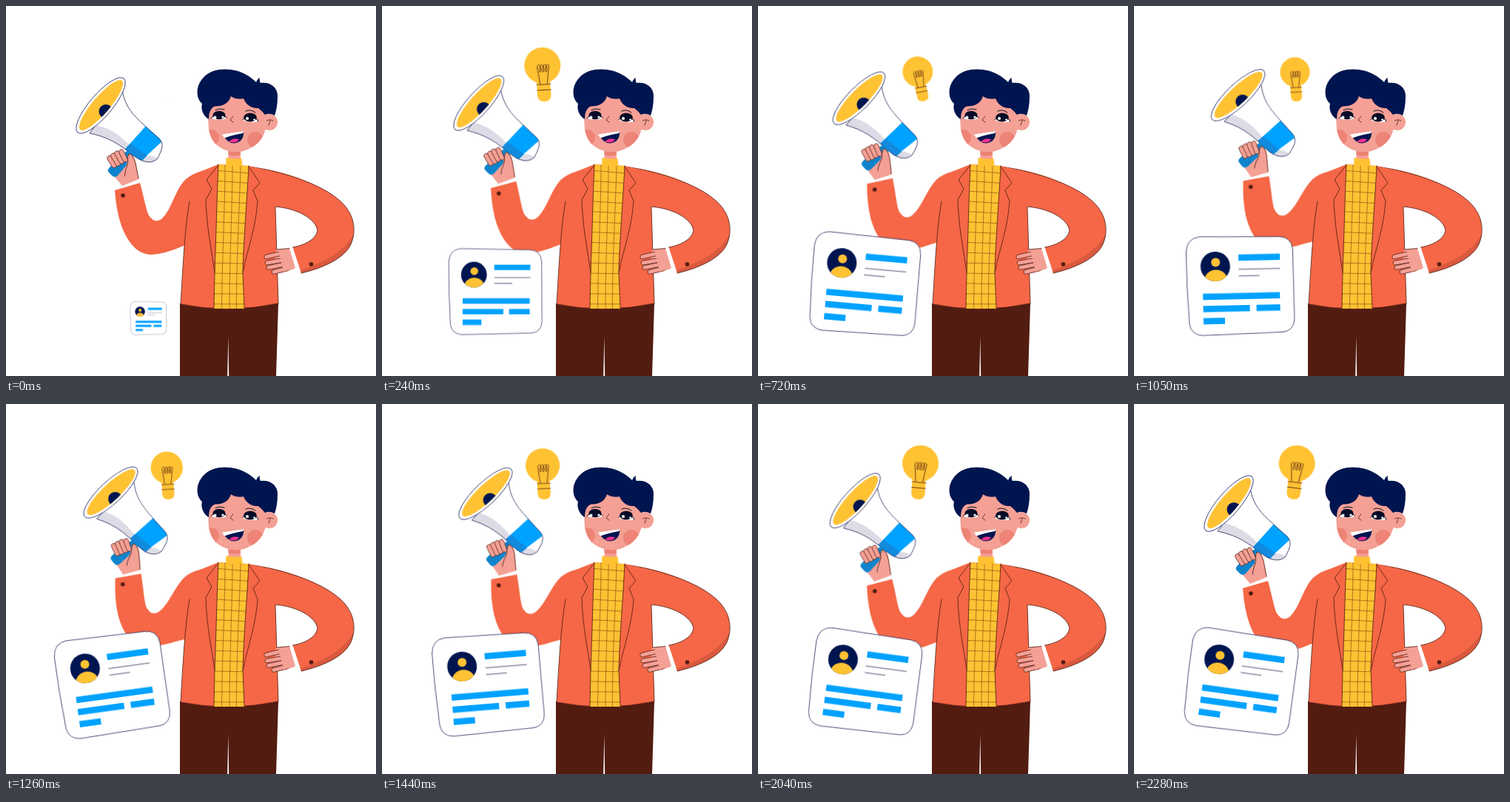
These frames come from a looping animation (500x500 px, 2450 ms). An HTML page:

```html
<!DOCTYPE html>
<html lang="en">
<head>
<meta charset="utf-8">
<title>Announcement</title>
<style>
html, body { margin: 0; width: 100%; height: 100%; overflow: hidden; background: #fff; }
svg { display: block; width: 100vw; height: 100vh; }

.orange { fill: #f56746; }
.skin { fill: #f4a095; }
.yellow { fill: #ffc233; }
.navy { fill: #001550; }
.blue { fill: #00a2ff; }
.brown { fill: #521c11; }
.white { fill: #fff; }
.grey { fill: #dddce6; }
.line { fill: none; stroke: #4c1a10; stroke-width: .8; stroke-linecap: round; stroke-linejoin: round; }
.thread { fill: none; stroke: #7a4310; stroke-width: .6; }
.ink { fill: none; stroke: #080c26; stroke-width: 1; stroke-linecap: round; stroke-linejoin: round; }
.edge { stroke: #24245a; stroke-width: .8; }
.knuckle { stroke: #4c1a10; stroke-width: .7; }

#arm, #bulb, #bulb-size, #card, #card-size {
  animation: 2450ms linear infinite;
}
#arm { transform-origin: 268px 248px; animation-name: swing; }
#bulb { transform-origin: 219px 100px; animation-name: bulb-tilt; }
#bulb-size { transform-origin: 219px 129px; animation-name: bulb-size; }
#card { transform-origin: 155px 381px; animation-name: card-tilt; }
#card-size { transform-origin: 217px 444.5px; animation-name: card-size; }

@keyframes swing {
  0% { transform: rotate(0deg); }
  42.86% { transform: rotate(6deg); }
  50.6% { transform: rotate(6.5deg); }
  58.8% { transform: rotate(5.7deg); }
  93.06%, 100% { transform: rotate(0deg); }
}
@keyframes bulb-tilt {
  0% { transform: rotate(0deg); }
  18.37% { transform: rotate(-5.5deg); }
  29.4% { transform: rotate(-11deg); }
  42.86% { transform: rotate(-3deg); }
  58.8% { transform: rotate(-2.5deg); }
  73.5% { transform: rotate(1.5deg); }
  88.16%, 100% { transform: rotate(7deg); }
}
@keyframes bulb-size {
  0% { transform: scale(0); }
  9.8% { transform: scale(1); }
  37% { transform: scale(.77); }
  66%, 100% { transform: scale(1); }
}
@keyframes card-tilt {
  0%, 12.2% { transform: rotate(0deg); }
  18.37% { transform: rotate(1deg); }
  31% { transform: rotate(5.7deg); animation-timing-function: ease-in; }
  42.86% { transform: rotate(-1.2deg); animation-timing-function: ease-out; }
  52.7% { transform: rotate(-8deg); }
  58.8% { transform: rotate(-4.7deg); }
  73.5% { transform: rotate(6deg); animation-timing-function: ease-out; }
  88.16%, 100% { transform: rotate(8deg); }
}
@keyframes card-size {
  0% { transform: scale(.335); }
  12.2%, 100% { transform: scale(1); }
}
</style>
</head>
<body>
<svg viewBox="0 0 500 500" xmlns="http://www.w3.org/2000/svg">
  <defs>
    <clipPath id="rim"><ellipse cx="128.5" cy="134" rx="43.5" ry="11.5" transform="rotate(-49.5 128.5 134)"/></clipPath>
    <path id="horn-shape" d="M157 114C161 136 171 147 189 163L207 179Q214 186 209 197L205 206Q197 214 184 209C168 203 154 180 113 172Z"/>
    <clipPath id="horn"><use href="#horn-shape"/></clipPath>
    <path id="face-shape" d="M274 140C272 165 274 181 289 191Q311 204 332 191C345 184 350 173 352 160V120H280Z"/>
    <clipPath id="face"><use href="#face-shape"/></clipPath>
    <path id="shirt-shape" d="M287 214L328 216C326 258 321 315 320 360L322 409H281L282 360C284 310 285 260 287 214Z"/>
    <clipPath id="shirt"><use href="#shirt-shape"/></clipPath>
    <path id="sleeve-shape" d="M340 219C370 222 440 243 461 274C471 288 473 306 466 322C458 340 430 354 399 361L387.500 326C411 322 422 310 420.500 301C416 286 391 272.500 361 271Z"/>
    <clipPath id="sleeve"><use href="#sleeve-shape"/></clipPath>
    <clipPath id="avatar"><circle cx="110.500" cy="351" r="20"/></clipPath>
  </defs>

  <!-- legs -->
  <path class="brown" d="M235 402H368L365 500H301.200L300.300 446L299.200 500H235Z"/>

  <g id="arm">
    <!-- megaphone -->
    <use href="#horn-shape" class="white"/>
    <g clip-path="url(#horn)">
      <path class="grey" d="M108 159C136 161 153 173 170 191L160 202L110 180Z"/>
      <path class="blue" d="M190 161L212 182L187 205L164 190Z"/>
      <path fill="#128ade" d="M168 186L191 202L184 211L160 194Z"/>
      <path class="grey" d="M191 202Q201 202 206 207L195 215L182 211Z"/>
    </g>
    <use href="#horn-shape" class="edge" fill="none"/>
    <g transform="rotate(-49.5 128 134.5)">
      <ellipse class="white edge" cx="128" cy="134.500" rx="48" ry="15"/>
    </g>
    <g clip-path="url(#rim)">
      <rect class="yellow" x="90" y="90" width="80" height="90"/>
      <circle class="navy" cx="135" cy="142.500" r="9.500"/>
    </g>

    <!-- hand -->
    <path class="skin" d="M160 206L168 199Q174 203 175 211L179.500 234L157 243L147 231Z"/>
    <path fill="#0f84cc" d="M163 196L174 200L170 207L151 229Q147 233 143 229L139 225Q136 222 140 218Z"/>
    <g class="skin knuckle">
      <rect x="139.500" y="201.500" width="6.500" height="18" rx="3.200" transform="rotate(-32 143 210)"/>
      <rect x="144.500" y="198" width="6.500" height="19" rx="3.200" transform="rotate(-31 148 207)"/>
      <rect x="149.500" y="195" width="6.500" height="19" rx="3.200" transform="rotate(-29 153 204)"/>
      <rect x="155" y="193.500" width="6.500" height="18" rx="3.200" transform="rotate(-26 158 202)"/>
    </g>
    <path class="skin" d="M164 207Q164 199 168.500 200Q173 203 175 212L178 228L161 232Z"/>
    <path class="line" d="M160.500 230C160 221 166 216 164.500 206Q165 198 169 201Q173 204 175 212L179 233"/>

    <!-- sleeve -->
    <path class="orange" d="M147 249L181 239C186 256 189 275 193 283Q202 296 212 286C224 274 229 247 243 234Q252 226 268 222L290 240L278 310L240 324Q215 335 197 336C174 336 162 313 156 297Q149 277 147 249Z"/>
    <circle class="brown" cx="158" cy="256" r="2.800"/>
  </g>

  <!-- right sleeve -->
  <use href="#sleeve-shape" class="orange"/>
  <path clip-path="url(#sleeve)" fill="#d9593f" d="M475 298C461 330 437 344 396 358V370H480Z"/>
  <path class="line" d="M361 271C391 272.500 416 286 420.500 301C422 310 411 322 387.500 326M399 361C430 354 458 340 466 322C473 306 471 288 461 274C440 243 370 222 328 217"/>
  <circle class="brown" cx="412.500" cy="349" r="2.800"/>

  <!-- jacket -->
  <path class="orange" d="M287 214L328 216L362 224L380 250L364 271L368 402Q301 416 236 403L241 323L248 264L262 224Z"/>
  <path class="line" d="M248 264C242 298 239 350 236 403M364 272L368 402M236 403Q301 416 368 402"/>
  <use href="#shirt-shape" class="yellow"/>
  <g clip-path="url(#shirt)">
    <path class="thread" d="M296 213C296 270 292 340 291.500 411M306 213C306 270 302 340 302 411M317 213C316 270 311 340 311.500 411"/>
    <g id="weave"></g>
  </g>
  <path class="line" d="M287 215L271 235L278 247L270 262C271 300 278 330 282 360M281 409L282 360C284 310 285 260 287 214M328 217L343 239L334 249L340 264C338 298 326 330 320 360M322 408L320 360C321 315 326 258 328 216"/>

  <!-- hand on hip -->
  <path class="skin" d="M365 329L383 327.500L391 354.500L379 359L362 362Z"/>
  <g class="skin knuckle">
    <rect x="359" y="357" width="24" height="5.800" rx="2.900" transform="rotate(-14 360 360)"/>
    <rect x="352" y="351" width="26" height="5.800" rx="2.900" transform="rotate(-12 353 354)"/>
    <rect x="350" y="344.500" width="26" height="5.800" rx="2.900" transform="rotate(-10 351 347)"/>
    <rect x="349" y="336.500" width="25" height="5.800" rx="2.900" transform="rotate(-13 350 340)"/>
  </g>
  <path class="skin" d="M368 330L383 328L390.500 354L375 359Z"/>
  <path class="line" d="M366 329L383 327.500"/>

  <!-- head -->
  <path class="skin" d="M300.500 188H317V209H300.500Z"/>
  <path fill="#ea7f72" d="M300.500 196H317V201Q308 204 300.500 201Z"/>
  <path class="yellow" d="M297.500 205Q309 208 318.500 206L319.500 216H297Z"/>
  <circle class="skin" cx="356" cy="157" r="11"/>
  <path class="line" d="M351 156Q355 152 361 155M357 155L355 161"/>
  <use href="#face-shape" class="skin"/>
  <g clip-path="url(#face)" fill="#ee8377">
    <circle cx="277" cy="178" r="11"/>
    <circle cx="337" cy="181" r="11"/>
  </g>
  <path class="navy" d="M274 153C266 148 263 139 265 132C256 124 257 109 264 100C273 87 289 84 304 86C320 88 331 96 338 103Q340 98 343 97Q342 101 344 104C357 102 367 110 367 121Q367 137 363 148Q356 144 350 147Q345 141 341 138C332 139 324 133 321 125Q311 127 304 122C301 132 292 136 282 135.500Q274 139 274 153Z"/>

  <!-- eyes, nose, mouth -->
  <path class="white" d="M277 152Q287 143 298.500 152Q288 155 277 152ZM320 154.500Q330 145 341 156Q330 158.500 320 154.500Z"/>
  <g fill="#080c26">
    <ellipse cx="288" cy="147.500" rx="8.500" ry="5.800"/>
    <ellipse cx="330" cy="150.500" rx="8.800" ry="6"/>
  </g>
  <g class="white">
    <circle cx="282.500" cy="150.500" r="1.900"/>
    <circle cx="293" cy="150" r="1.600"/>
    <circle cx="326" cy="152" r="2.100"/>
    <circle cx="335.500" cy="153.500" r="1.300"/>
  </g>
  <path class="ink" d="M277 152Q287 137 298.500 151M320 153.500Q330 138 341 156M283 140.500Q289 137.500 295 140M324 142Q331 139 337 144"/>
  <path class="line" d="M307 149L303 154L307 157"/>
  <path class="navy" d="M293 174L321 169.500C322 179 316 185 308 185.500Q299 185 293 174Z"/>
  <path class="white" d="M292 173.500L321.500 169L320 172Q306 174 295 178.500Z"/>
  <path fill="#f03090" d="M301.500 183Q307 177 315 180.500Q311 187 301.500 183Z"/>

  <!-- bulb -->
  <g id="bulb"><g id="bulb-size">
    <path class="yellow" d="M208.800 103A24.500 24.500 0 1 1 226.800 103L227.500 120Q227.500 129 218.500 129Q209 129 209 120Z"/>
    <path class="line" d="M209 106H227.500M209 113.500H227.500M213.500 105L210.500 82C212 77 216 79 215.500 86C215 91.500 212.500 90 214 83C216 77 220 78 219.500 86C219 91.500 216.500 90 218 83C220 77 224 78 223.500 86C223 91.500 220.500 90 222 83Q224 77 226.500 81L223 105"/>
  </g></g>

  <!-- profile card -->
  <g id="card-size"><g id="card">
    <path class="white edge" d="M90 310.500L197 312.500Q214 313 215.500 330L216 424Q215 440 200 441.500L92 444Q76 443 74 428Q71 378 71.500 330Q73 312 90 310.500Z"/>
    <circle class="navy" cx="110.500" cy="351" r="20"/>
    <circle class="yellow" cx="111" cy="345.500" r="6"/>
    <ellipse class="yellow" cx="111" cy="371" rx="16" ry="15.500" clip-path="url(#avatar)"/>
    <path class="blue" d="M142 335.500H198V344H142ZM93 387.500H197V396H93ZM93 404H156V412.500H93ZM165 404H197V412.500H165ZM93 420.500H122V429H93Z"/>
    <path fill="none" stroke="#8b8a9e" stroke-width="1.600" d="M142 355.500H198M142 364.500H170"/>
  </g></g>
</svg>
<script>
// Horizontal threads of the sweater.
const rows = Array.from({ length: 14 }, (_, i) => {
  const y = 222 + i * 13.9;
  const drop = 4 - i * 0.3;
  return `<path class="thread" d="M280 ${y}L330 ${y + drop}"/>`;
});
document.getElementById('weave').innerHTML = rows.join('');
</script>
</body>
</html>
```
